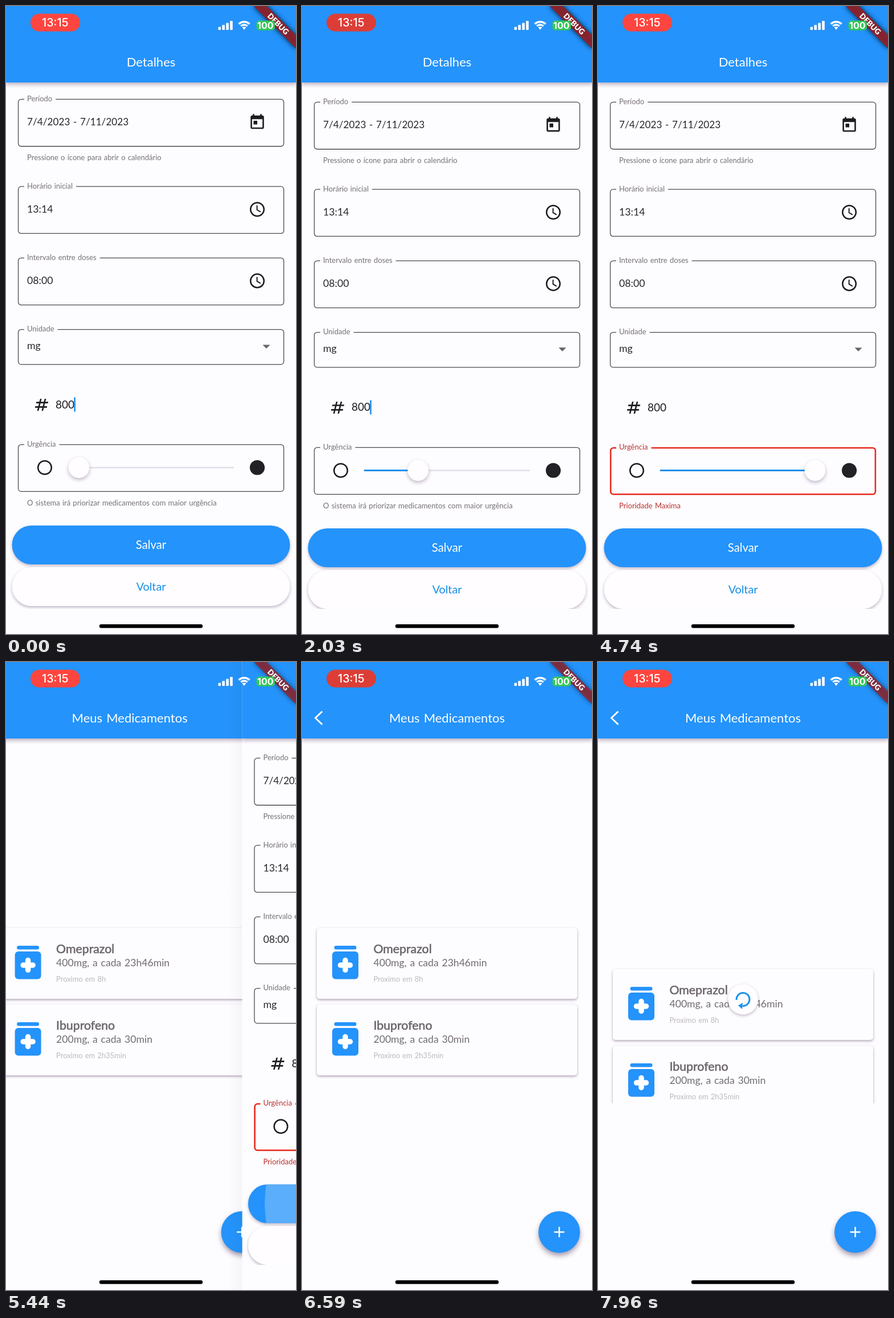
Animation of 509 by 1100 pixels, one loop 8000 ms. Source, as an HTML page with a canvas:

```html
<!DOCTYPE html>
<html lang="pt">
<head>
<meta charset="utf-8">
<title>Medicamentos</title>
<style>
html, body { margin: 0; width: 100%; height: 100%; overflow: hidden; background: #fdfcff; }
canvas { display: block; width: 509px; height: 1100px; }
</style>
</head>
<body>
<canvas id="stage" width="509" height="1100"></canvas>
<script>
const W = 509, H = 1100, LOOP = 8000, U = 1.305;
const ctx = document.getElementById('stage').getContext('2d');
const BLUE = '#2493fb', PAPER = '#fdfcff', INK = '#1d1c20', TEXT = '#29272c', MUTED = '#767178';
const FONT = 'Lato, "Noto Sans", sans-serif';

const ICONS = {
  today: new Path2D('M19 3h-1V1h-2v2H8V1H6v2H5c-1.1 0-2 .9-2 2v14c0 1.1.9 2 2 2h14c1.1 0 2-.9 2-2V5c0-1.1-.9-2-2-2zM19 19H5V8h14zM7 10h5v5H7z'),
  number: new Path2D('M20.5 10L21 8h-4l1-4h-2l-1 4h-4l1-4h-2L9 8H5l-.5 2h4l-1 4h-4L3 16h4l-1 4h2l1-4h4l-1 4h2l1-4h4l.5-2h-4l1-4zM13.5 14h-4l1-4h4z'),
  drop: new Path2D('M7 10l5 5 5-5z')
};

const clamp = v => Math.max(0, Math.min(1, v));
const ramp = (t, a, b) => clamp((t - a) / (b - a));
const smooth = v => v * v * (3 - 2 * v);
const mix = (a, b, v) => a + (b - a) * v;

function bezier(x1, y1, x2, y2) {
  const at = (a, b, s) => 3 * a * s * (1 - s) ** 2 + 3 * b * s * s * (1 - s) + s ** 3;
  return x => {
    if (x <= 0 || x >= 1) return clamp(x);
    let lo = 0, hi = 1;
    for (let i = 0; i < 24; i++) {
      const mid = (lo + hi) / 2;
      if (at(x1, x2, mid) < x) lo = mid; else hi = mid;
    }
    return at(y1, y2, lo);
  };
}
const slideOut = bezier(.35, .91, .33, .97);

function scoped(draw) {
  ctx.save();
  draw();
  ctx.restore();
}

function clipRect(x, y, w, h) {
  ctx.beginPath();
  ctx.rect(x, y, w, h);
  ctx.clip();
}

function text(str, x, y, size, color, o = {}) {
  ctx.font = `${o.weight || 400} ${size}px ${o.font || FONT}`;
  ctx.wordSpacing = o.font ? '0px' : size * .07 + 'px';
  ctx.textAlign = o.align || 'left';
  ctx.fillStyle = ctx.strokeStyle = color;
  ctx.fillText(str, x, y);
  if (o.bolder) {
    ctx.lineWidth = o.bolder;
    ctx.strokeText(str, x, y);
  }
}

function shadow(color, blur, dy) {
  ctx.shadowColor = color;
  ctx.shadowBlur = blur;
  ctx.shadowOffsetY = dy;
}

function box(x, y, w, h, r, color) {
  ctx.beginPath();
  ctx.roundRect(x, y, w, h, r);
  ctx.fillStyle = color;
  ctx.fill();
}

function raised(x, y, w, h, r, color, blur = 5, dy = 2.6, tint = 'rgba(60,25,70,.3)') {
  scoped(() => {
    shadow(tint, blur, dy);
    box(x, y, w, h, r, color);
  });
}

function disc(x, y, r, color) {
  ctx.beginPath();
  ctx.arc(x, y, r, 0, 7);
  ctx.fillStyle = color;
  ctx.fill();
}

function line(points, width, color, cap = 'butt') {
  ctx.beginPath();
  points.forEach(([x, y]) => ctx.lineTo(x, y));
  ctx.lineWidth = width;
  ctx.lineCap = cap;
  ctx.strokeStyle = color;
  ctx.stroke();
}

function ring(x, y, r, width, color, from = 0, to = 2 * Math.PI) {
  ctx.beginPath();
  ctx.arc(x, y, r, from, to);
  ctx.lineWidth = width;
  ctx.lineCap = 'butt';
  ctx.strokeStyle = color;
  ctx.stroke();
}

function icon(name, x, y, color) {
  scoped(() => {
    ctx.translate(x - 12 * U, y - 12 * U);
    ctx.scale(U, U);
    ctx.fillStyle = color;
    ctx.fill(ICONS[name], 'evenodd');
  });
}

function clockIcon(x, y) {
  ring(x, y, 11.8, 2.5, INK);
  line([[x - .4, y - 7], [x - .4, y + .8], [x + 5.8, y + 4.5]], 2, INK);
}

// The outer edge stays in place whatever the line width.
function outline(y, h, label, color, width, labelColor) {
  const inset = width / 2;
  ctx.beginPath();
  ctx.roundRect(20.9 + inset, y + inset, 467.3 - width, h - width, 5);
  ctx.strokeStyle = color;
  ctx.lineWidth = width;
  ctx.stroke();
  ctx.font = `400 13px ${FONT}`;
  ctx.wordSpacing = '.91px';
  ctx.fillStyle = PAPER;
  ctx.fillRect(32, y - 2, ctx.measureText(label).width + 11, 6);
  text(label, 37, y + 4.2, 13, labelColor);
}

const field = (y, h, label) => outline(y, h, label, '#4d4950', 1.3, MUTED);

function header(title) {
  raised(0, 0, W, 134, 0, BLUE, 6, 4);
  text(title, W / 2, 106, 22, '#fff', { align: 'center' });
}

function banner() {
  scoped(() => {
    clipRect(0, 0, W, 134);
    ctx.translate(W, 0);
    ctx.rotate(Math.PI / 4);
    scoped(() => {
      shadow('rgba(0,0,0,.5)', 8, 0);
      ctx.fillStyle = '#000';
      // Only the shadow of this offscreen bar lands on the stage.
      ctx.shadowOffsetX = 2000 / Math.SQRT2;
      ctx.shadowOffsetY = 2000 / Math.SQRT2;
      ctx.fillRect(-52 - 2000, 36.5, 104, 15.7);
    });
    ctx.fillStyle = 'rgba(18,74,125,.5)';
    ctx.fillRect(-52, 36.5, 104, 15.7);
    ctx.fillStyle = 'rgba(183,28,28,.64)';
    ctx.fillRect(-52, 36.5, 104, 15.7);
    text('DEBUG', 0, 49, 13.3, '#fff', { font: 'Lato, sans-serif', weight: 900, align: 'center' });
  });
}

function cursorAlpha(t) {
  const s = t % 1000 / 1000;
  return s < .75 ? 1 - ramp(s, .5, .65) : ramp(s, .85, 1);
}

function slider(t) {
  const y = 813.5, pos = smooth(ramp(t, 1650, 2700)), x = mix(128, 381, pos);
  ring(68, y, 11.8, 2.5, INK);
  disc(441, y, 13.1, '#222126');
  line([[110, y], [399, y]], 2.6, '#e2dfe9', 'round');
  if (pos > 0) line([[110, y], [x, y]], 2.8, '#2090ee', 'round');
  raised(x - 18.4, y - 18.4, 36.8, 36.8, 18.4, '#fffdff', 6, 3);
}

function urgency(t) {
  const alarm = ramp(t, 2690, 2860);
  scoped(() => {
    ctx.globalAlpha = 1 - alarm;
    field(772.7, 83.3, 'Urgência');
    ctx.globalAlpha = alarm;
    outline(772.7, 83.8, 'Urgência', '#ea2a1f', 2.6, '#b8332f');
  });
  slider(t);
  scoped(() => {
    ctx.globalAlpha = 1 - ramp(alarm, 0, .5);
    text('O sistema irá priorizar medicamentos com maior urgência', 37, 880, 13, MUTED);
    ctx.globalAlpha = ramp(alarm, .5, 1);
    text('Prioridade Maxima', 37, 880, 13, '#b8332f');
  });
}

function saveButton(t) {
  raised(10.5, 915, 488, 68, 34, BLUE);
  const grow = ramp(t, 5140, 5460);
  if (grow > 0) scoped(() => {
    ctx.beginPath();
    ctx.roundRect(10.5, 915, 488, 68, 34);
    ctx.clip();
    disc(250, 949, mix(25, 222, grow), `rgba(255,255,255,${.25 * ramp(t, 5140, 5220)})`);
  });
  text('Salvar', W / 2, 956, 20.3, '#fff', { align: 'center' });
}

function detailsPage(t) {
  ctx.fillStyle = PAPER;
  ctx.fillRect(0, 0, W, H);
  scoped(() => {
    clipRect(0, 134, W, 922);
    ctx.translate(0, -5 * Math.exp(-t / 360));

    field(167.8, 83.6, 'Período');
    text('7/4/2023 - 7/11/2023', 37, 214, 17.2, TEXT);
    icon('today', 441, 208.5, INK);
    text('Pressione o ícone para abrir o calendário', 37, 275, 13, MUTED);

    field(320.5, 83.6, 'Horário inicial');
    text('13:14', 37, 366.7, 17.7, TEXT);
    clockIcon(441, 361.2);

    field(445.7, 83.6, 'Intervalo entre doses');
    text('08:00', 37, 491.9, 17.7, TEXT);
    clockIcon(441, 486.4);

    field(570.9, 62.6, 'Unidade');
    text('mg', 37, 606, 17.7, TEXT);
    icon('drop', 457, 601, '#68646a');

    icon('number', 62.5, 703.5, INK);
    text('800', 87, 709.5, 19, INK);
    ctx.fillStyle = `rgba(33,143,238,${cursorAlpha(t)})`;
    ctx.fillRect(119.3, 690.5, 2.6, 25);

    urgency(t);
    saveButton(t);
    raised(10.5, 988, 488, 68, 34, '#fffdff');
    text('Voltar', W / 2, 1029, 19.7, '#168fe8', { align: 'center' });
  });
  header('Detalhes');
  banner();
}

function medicineCard(y, name, dose, next) {
  raised(26, y, 457, 124, 5, PAPER, 4, 2, 'rgba(60,25,70,.38)');
  box(56.5, y + 31, 39, 6.5, 3.2, BLUE);
  box(53, y + 41, 46, 48.5, 6, BLUE);
  line([[67.5, y + 65], [84.5, y + 65]], 9.5, '#fff', 'round');
  line([[76, y + 56.5], [76, y + 73.5]], 9.5, '#fff', 'round');
  text(name, 125.5, y + 44, 21.3, '#6c676b', { bolder: .6 });
  text(dose, 125.5, y + 67, 17.6, '#716c70');
  text(next, 125.5, y + 94, 12.9, '#bdb9bd');
}

function refreshBadge(pull) {
  const x = 254.5, y = mix(388, 591, pull);
  const start = (175 - 200 * (1 - pull)) * Math.PI / 180;
  const end = start + 280 * pull * Math.PI / 180;
  raised(x - 26.5, y - 26.5, 53, 53, 26.5, '#fffdff', 5, 2);
  scoped(() => {
    ctx.globalAlpha = ramp(pull, .1, .8);
    ctx.translate(x, y);
    ring(0, 0, 11.5, 3, '#1b93ec', start, end);
    ctx.rotate(end);
    ctx.beginPath();
    ctx.moveTo(5.8, 0);
    ctx.lineTo(17.2, 0);
    ctx.lineTo(11.5, 7.5);
    ctx.fillStyle = '#1b93ec';
    ctx.fill();
  });
}

function listPage(t) {
  const pull = Math.sin(ramp(t, 7490, 7965) * Math.PI / 2);
  ctx.fillStyle = PAPER;
  ctx.fillRect(0, 0, W, H);
  scoped(() => {
    clipRect(0, 417, W, 356);
    scoped(() => {
      ctx.translate(0, 72 * pull);
      medicineCard(466, 'Omeprazol', '400mg, a cada 23h46min', 'Proximo em 8h');
      medicineCard(600, 'Ibuprofeno', '200mg, a cada 30min', 'Proximo em 2h35min');
    });
    if (pull > 0) refreshBadge(pull);
  });
  raised(415, 962, 73, 73, 36.5, BLUE, 9, 5, 'rgba(50,25,60,.42)');
  line([[442.5, 998.5], [460.5, 998.5]], 2.5, '#fff');
  line([[451.5, 989.5], [451.5, 1007.5]], 2.5, '#fff');
  header('Meus Medicamentos');
  line([[35.5, 86.5], [23.5, 98], [35.5, 109.5]], 2.8, '#fff');
}

function pages(t) {
  const gone = slideOut(ramp(t, 5258, 5758));
  if (gone > 0) scoped(() => {
    ctx.translate(-170 * (1 - gone) ** .9, 0);
    listPage(t);
  });
  if (gone < 1) scoped(() => {
    ctx.translate(W * gone, 0);
    if (gone > 0) {
      const edge = ctx.createLinearGradient(-25, 0, 0, 0);
      edge.addColorStop(0, 'rgba(0,0,0,0)');
      edge.addColorStop(1, 'rgba(0,0,0,.03)');
      ctx.fillStyle = edge;
      ctx.fillRect(-25, 0, 25, H);
    }
    clipRect(0, 0, W, H);
    detailsPage(t);
  });
}

function statusBar(t) {
  const glow = smooth(clamp(.5 + 2 * Math.cos((t - 258) / 4300 * 2 * Math.PI)));
  const red = [mix(220, 255, glow), mix(62, 69, glow), mix(55, 63, glow)].map(Math.round);
  box(43, 13.5, 87, 31, 15.5, `rgb(${red})`);
  text('13:15', 86.3, 36.3, 19.7, '#fff', { font: 'Inter, sans-serif', weight: 500, align: 'center' });

  for (let i = 0; i < 4; i++) {
    const h = 5.5 + i * 3.5;
    box(372.5 + i * 6.9, 42 - h, 4.6, h, 1.3, '#fff');
  }
  const a = -Math.PI * .75, b = -Math.PI * .25;
  ring(418, 41, 13.3, 3.5, '#fff', a, b);
  ring(418, 41, 8.2, 3.3, '#fff', a, b);
  ctx.beginPath();
  ctx.moveTo(418, 41.8);
  ctx.arc(418, 41, 4.8, a, b);
  ctx.fillStyle = '#fff';
  ctx.fill();

  box(439.5, 25.5, 32.5, 17, 5, '#34c759');
  text('100', 455.3, 39.8, 16, '#fff', { font: 'Inter, sans-serif', weight: 700, align: 'center' });
  box(163.8, 1083, 181.4, 6.5, 3.2, '#000');
}

const begin = performance.now();
function frame() {
  const t = (performance.now() - begin) % LOOP;
  pages(t);
  banner();
  statusBar(t);
  requestAnimationFrame(frame);
}
frame();
</script>
</body>
</html>
```
